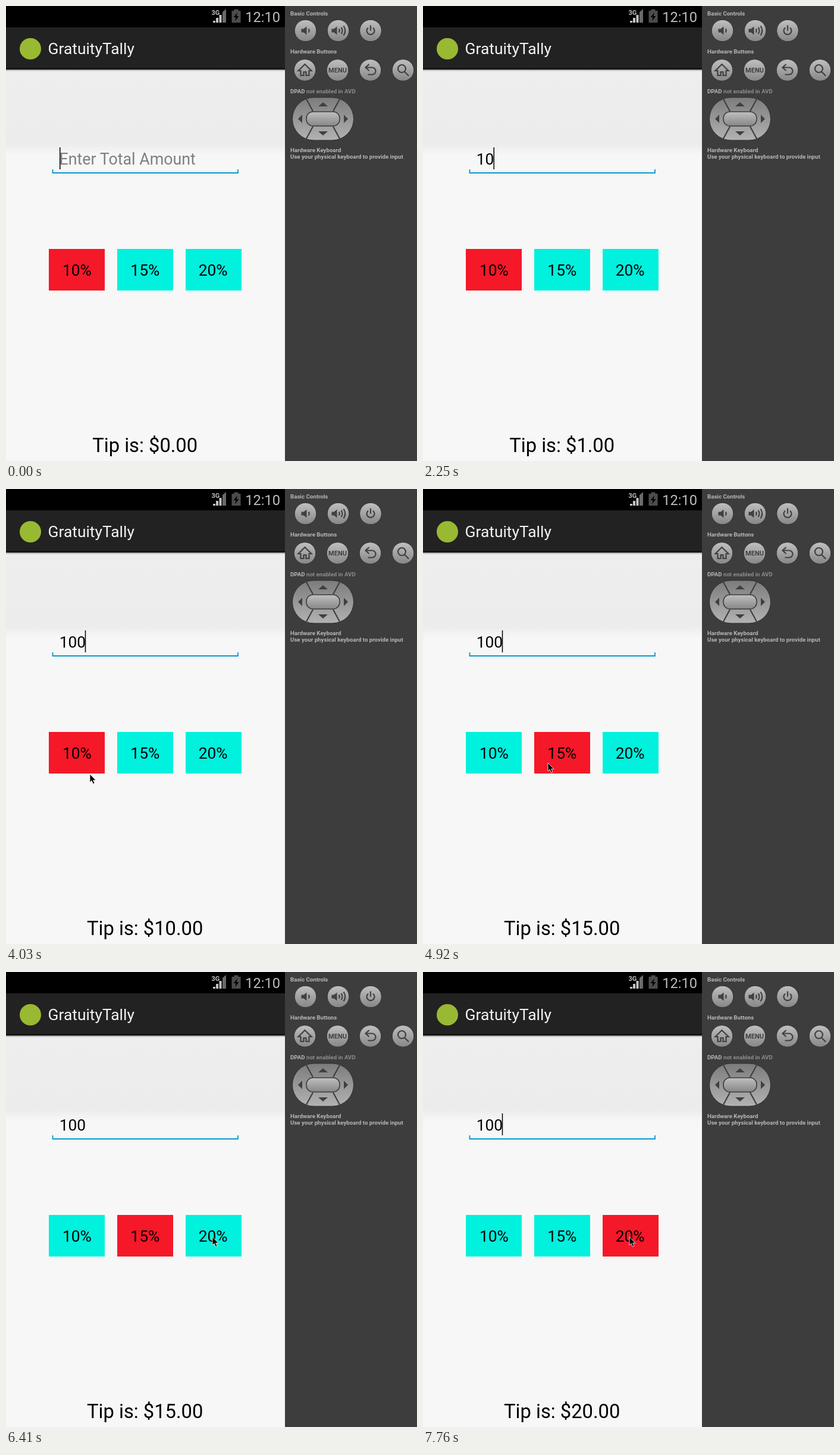
These frames come from a looping animation (691x766 px, 8000 ms). An HTML page:

```html
<!DOCTYPE html>
<html lang="en">
<head>
<meta charset="utf-8">
<title>Gratuity demo</title>
<style>
  html, body { margin: 0; width: 100%; height: 100%; overflow: hidden; background: #f7f7f7; }
  svg { display: block; width: 691px; height: 766px; font: 26.4px Roboto, sans-serif; }
  .label { font-size: 9.7px; font-weight: 700; fill: #b6b6b6; }
  .icon { fill: none; stroke: #404040; stroke-width: 2.2; }
  .solid { fill: #404040; }
</style>
</head>
<body>
<svg viewBox="0 0 691 766">
  <defs>
    <linearGradient id="page" gradientUnits="userSpaceOnUse" x1="0" y1="106" x2="0" y2="766">
      <stop offset="0" stop-color="#eee"/>
      <stop offset=".19" stop-color="#ececec"/>
      <stop offset=".22" stop-color="#f7f7f7"/>
    </linearGradient>
    <linearGradient id="metal" x2="0" y2="1">
      <stop stop-color="#c0c0c0"/>
      <stop offset="1" stop-color="#868686"/>
    </linearGradient>
    <linearGradient id="pad" x2="0" y2="1">
      <stop stop-color="#7c7c7c"/>
      <stop offset="1" stop-color="#b2b2b2"/>
    </linearGradient>
    <linearGradient id="shade" x2="0" y2="1">
      <stop stop-color="#999"/>
      <stop offset="1" stop-color="#ececec"/>
    </linearGradient>
    <circle id="key" r="18.3" fill="url(#metal)" stroke="#333"/>
  </defs>

  <!-- App screen -->
  <rect y="106" width="469" height="660" fill="url(#page)"/>
  <rect width="469" height="36"/>
  <rect y="36" width="469" height="68" fill="#222"/>
  <rect y="104" width="469" height="3" fill="#161616"/>
  <rect y="107" width="469" height="3" fill="url(#shade)"/>

  <text x="345.5" y="14.5" font-size="11" font-weight="700" fill="#bebebe">3G</text>
  <path d="M348 28v-3h4v3zM353 28v-8h4v8zM358.5 28V15h4v13z" fill="#c4c4c4"/>
  <path d="M364 28V10l6-5v23z" fill="#6a6a6a"/>
  <path d="M379.5 8h4V5.5h7V8h4v20h-15z" fill="#4c4c4c"/>
  <path d="M389 11l-6.5 8h4l-1.5 6.5 6.5-8.500h-4z"/>
  <text x="402.3" y="27" font-size="23.6" fill="#bebebe">12:10</text>
  <circle cx="41" cy="72" r="18" fill="#99b933"/>
  <text x="70.5" y="81" fill="#f3f3f3">GratuityTally</text>

  <text id="hint" x="89.5" y="267" font-size="26.8" fill="#808080">Enter Total Amount</text>
  <text id="amount" x="89.7" y="267"></text>
  <rect id="caret" y="238" width="1.5" height="37"/>
  <path d="M78.5 275v6h311.500v-6" fill="none" stroke="#0a97cd" stroke-width="1.8"/>
  <g id="choices"></g>
  <text id="tip" x="233.7" y="751" font-size="32.7" text-anchor="middle"></text>
  <path id="pointer" d="M0 0v14l3-3 2.5 5.5 2.5-1.2-2.4-5H10z" stroke="#fff" stroke-width=".8"/>

  <!-- Device controls -->
  <rect x="469" width="222" height="766" fill="#3d3d3d"/>
  <g class="label">
    <text x="478" y="16">Basic Controls</text>
    <text x="478" y="80">Hardware Buttons</text>
    <text x="478" y="146.5">DPAD <tspan fill="#8c8c8c">not enabled in AVD</tspan></text>
    <text x="478" y="245.5">Hardware Keyboard</text>
    <text x="478" y="256.5">Use your physical keyboard to provide input</text>
  </g>

  <g transform="translate(503.5 41.5)">
    <use href="#key"/>
    <path class="solid" d="M-7-3h4l5-4V7l-5-4h-4z"/>
    <path class="icon" d="M5-3q2.5 3 0 6"/>
  </g>
  <g transform="translate(558.5 41.5)">
    <use href="#key"/>
    <path class="solid" d="M-11-3h4l5-4V7l-5-4h-4z"/>
    <path class="icon" d="M1-3q2.5 3 0 6M5-5.500q4 5.500 0 11M9-8q5.500 8 0 16"/>
  </g>
  <g transform="translate(613 41.5)">
    <use href="#key"/>
    <path class="icon" d="M-4-5a6.500 6.500 0 1 0 8 0M0-9v9"/>
  </g>
  <g transform="translate(502.5 108)">
    <use href="#key"/>
    <path class="icon" d="M-11 1L0-10 11 1H7v8H2V3h-4v6h-5V1z"/>
  </g>
  <g transform="translate(557.5 108)">
    <use href="#key"/>
    <text class="solid" y="4" font-size="11" font-weight="700" text-anchor="middle">MENU</text>
  </g>
  <g transform="translate(612.5 108)">
    <use href="#key"/>
    <path class="icon" d="M-2-10l-6 5.500 6 5.500M-8-4.500H3a6 6 0 0 1 0 12h-7"/>
  </g>
  <g transform="translate(667.5 108)">
    <use href="#key"/>
    <circle class="icon" cx="-2" cy="-2.5" r="6.5"/>
    <path class="icon" stroke-linecap="round" d="M3 3l6 6"/>
  </g>

  <g transform="translate(533 190)">
    <rect x="-51.5" y="-36" width="103" height="72" rx="36" fill="url(#pad)" stroke="#303030"/>
    <path class="icon" d="M-29-35l12 22M29-35L17-13M-29 35l12-22M29 35L17 13"/>
    <rect x="-28" y="-12" width="56" height="24" rx="11" fill="url(#metal)" stroke="#3c3c3c" stroke-width="1.5"/>
    <path class="solid" d="M-8-21l8-7 8 7zM-8 21l8 7 8-7zM-35-7v14l-7-7zM35-7v14l7-7z"/>
  </g>
</svg>
<script>
const LOOP = 8000;
const get = id => document.getElementById(id);
const [hint, amount, caret, choices, tip, pointer] =
  ['hint', 'amount', 'caret', 'choices', 'tip', 'pointer'].map(get);

const rates = [10, 15, 20];
choices.innerHTML = rates.map((rate, i) =>
  `<rect x="${72.3 + i * 114.6}" y="409" width="94" height="70" shape-rendering="crispEdges"/>
   <text x="${119.4 + i * 114.4}" y="454" text-anchor="middle">${rate}%</text>`
).join('');
const boxes = choices.querySelectorAll('rect');

const keyTimes = [1350, 2250, 2690];
const rateTimes = [4920, 6860];
const blinkTimes = [300, 900, 3290, 3730, 4320, 4770, 5370, 5660, 6260, 6860, 7310, 7760];
const passed = (times, t) => times.filter(at => at <= t).length;

// The pointer advances in short hops between [x, y] waypoints.
const start = [87, 502], below = [141, 480], second = [210, 461], third = [347, 446];
const mix = (a, b, k) => a.map((v, i) => Math.round(v + (b[i] - v) * k));
const hops = (t, from, pace) => Math.max(0, Math.min(5, Math.floor((t - from) / pace)));

function pointerAt(t) {
  if (t >= 5660) return mix(second, third, hops(t, 5660, 150) / 5);
  const k = hops(t, 3730, 148);
  return k < 2 ? mix(start, below, k / 2) : mix(below, second, (k - 2) / 3);
}

function draw() {
  const t = performance.now() % LOOP;
  const typed = '100'.slice(0, passed(keyTimes, t));
  const chosen = passed(rateTimes, t);

  hint.style.display = typed ? 'none' : '';
  amount.textContent = typed;
  caret.setAttribute('x', 90 + typed.length * 14.25);
  caret.style.display = passed(blinkTimes, t) % 2 ? 'none' : '';
  boxes.forEach((box, i) => box.setAttribute('fill', i === chosen ? '#f51828' : '#00f1dd'));
  tip.textContent = 'Tip is: $' + (typed * rates[chosen] / 100).toFixed(2);

  pointer.style.display = t < 3730 ? 'none' : '';
  pointer.setAttribute('transform', `translate(${pointerAt(t)})`);
  requestAnimationFrame(draw);
}
draw();
</script>
</body>
</html>
```
